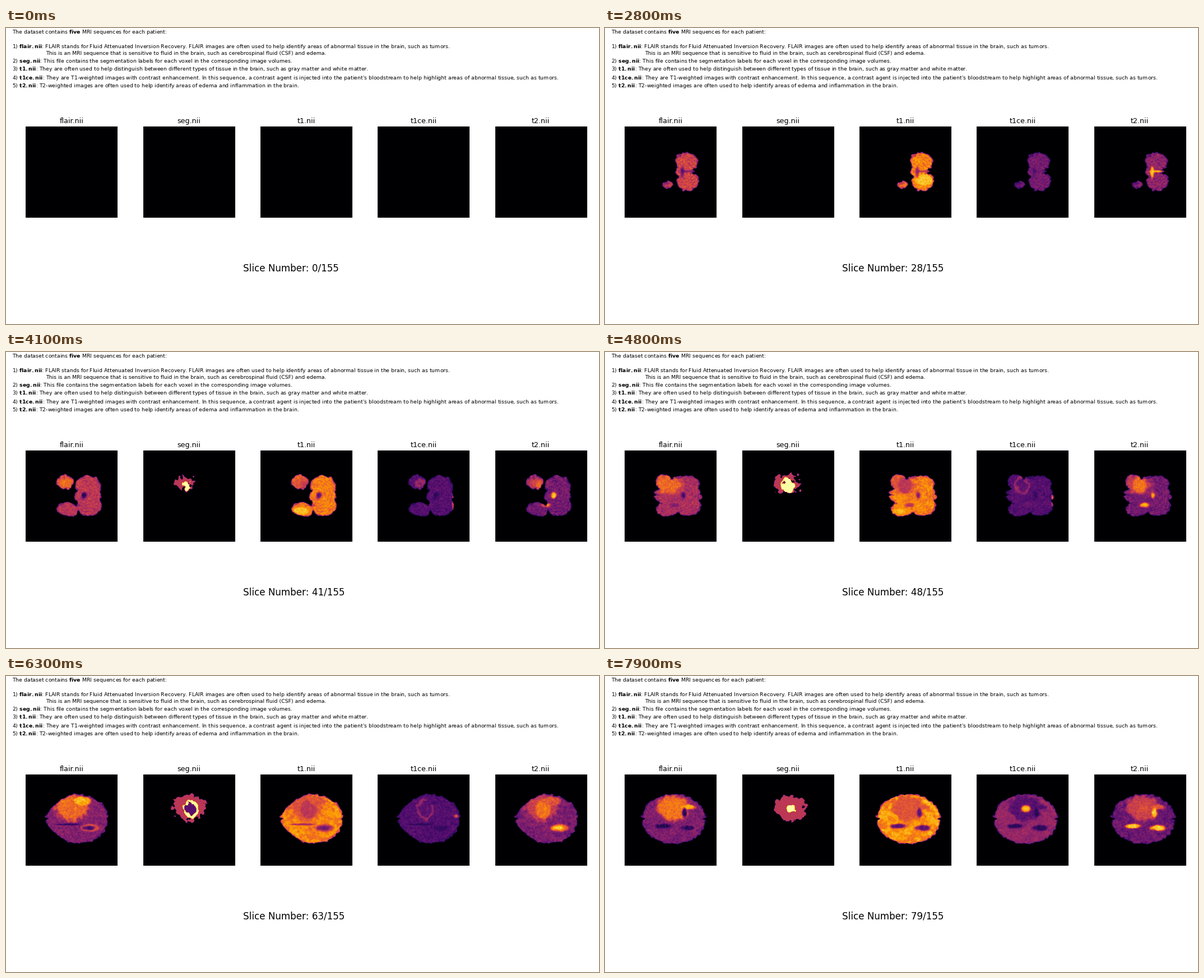
A matplotlib script that plays this animation: 1058x529 px, repeating every 8000 ms.

```python
import numpy as np
import matplotlib.pyplot as plt
from matplotlib.animation import FuncAnimation

W, H, DPI = 1058, 529, 64
SLICES, N, SIDE = 80, 240, 163.4
LEFT, TOP, PITCH = 35.4, 176, 209.3

plt.rcParams["font.family"] = "DejaVu Sans"
plt.rcParams["mathtext.fontset"] = "dejavusans"

# Pixel grid of one scan, in stage coordinates of the first panel.
steps = (np.arange(N) + 0.5) * SIDE / N
X, Y = np.meshgrid(LEFT + steps, TOP + steps)
rng = np.random.default_rng(7)


def noise(sz, sxy):
    """Smooth random volume with unit spread."""
    v = np.fft.rfftn(rng.standard_normal((SLICES, N, N)))
    fz = np.fft.fftfreq(SLICES)[:, None, None]
    fy = np.fft.fftfreq(N)[None, :, None]
    fx = np.fft.rfftfreq(N)[None, None, :]
    v *= np.exp(-2 * np.pi**2 * (sz**2 * fz**2 + sxy**2 * (fy**2 + fx**2)))
    v = np.fft.irfftn(v, s=(SLICES, N, N), axes=(0, 1, 2))
    return (v / v.std()).astype(np.float32)


coarse, grain = noise(2.5, 3.2), noise(0.8, 1.1)


def soft(field, w=0.8):
    return 1 / (1 + np.exp(-np.clip(field / w, -30, 30)))


def solid(z, center, radii, lean=0):
    """Slice of an ellipsoid: positive inside, about the pixels to its edge."""
    (cx, cy, cz), (rx, ry, rz) = center, radii
    dx = (X - cx - lean * (z - cz)) / rx
    r = np.sqrt(dx**2 + ((Y - cy) / ry) ** 2 + ((z - cz) / rz) ** 2)
    return (1 - r) * np.sqrt(rx * ry)


def cerebrum(z):
    """Flat-bottomed ellipsoid, pointed to the left in low slices."""
    dx = (X - 128 + 0.2 * (z - 54)) / 57
    dy = (Y - 256) / 44.5
    point = 1.5 * max(0, (79 - z) / 25) ** 2
    dy = dy * (1 + point * np.clip(-dx, 0, None) ** 2)
    r = np.sqrt(dx**2 + dy**2 + ((z - 76) / 34) ** 4)
    return (1 - r) * 50 - 4 * np.exp(-(((Y - 256) / 1.8) ** 2))


# Lower anatomy as (center, radii): cerebellum, vermis, stem, temporal lobes.
LOWER = [
    ((146, 241, 42), (23, 20, 30)),
    ((148, 274, 42), (23, 20, 30)),
    ((146, 257, 44), (25, 15, 20)),
    ((138, 257, 24), (12, 11, 19)),
    ((106, 233, 46), (16, 14, 15)),
    ((111, 282, 46), (20, 13, 21)),
]

# Tones of each tissue in flair, t1, t1ce and t2; nan keeps what lies below.
nan = np.nan
FLUID = (.14, .27, .15, .88)
HALO = (.64, .52, .23, .66)
CISTERN = (.36, .5, .3, .85)
FISSURE = (.18, .45, .16, .38)
MYELIN = (nan, .86, nan, nan)
VESSEL = (nan, nan, .75, nan)
EDEMA = (.69, .6, .25, .54)
BRIGHT_EDEMA = (.83, .61, .24, .62)
TUMOR = (.66, .5, .26, .69)
RIM = (nan, nan, .47, nan)
NODULE = (.7, .62, .85, .6)

FEATURES = [
    (MYELIN, (150, 272, 24), (17, 10, 14)),
    (MYELIN, (107, 285, 42), (14, 7, 8)),
    (CISTERN, (138, 258, 28), (3, 10, 9)),
    (CISTERN, (147, 257, 23), (14, 2, 12)),
    (CISTERN, (125, 274, 48), (8, 4, 11)),
    (FLUID, (139, 257, 40), (4.5, 5, 11)),
    (VESSEL, (170, 268, 41), (2, 14, 9)),
    (VESSEL, (175, 251, 59), (3, 2.5, 9)),
    (FISSURE, (110, 266, 62), (22, 1.8, 11)),
    (BRIGHT_EDEMA, (136, 224, 64), (15, 8, 11)),
    (BRIGHT_EDEMA, (148, 235, 79), (13, 4, 8)),
    (HALO, (150, 272, 68), (18, 7, 14)),
    (FLUID, (148, 272, 72), (14, 5, 14)),
    (FLUID, (103, 269, 79), (13, 4, 7)),
    (FLUID, (142, 244, 80), (4, 9, 7)),
]

# Healthy tissue at a few depths, again per channel.
DEPTHS = (15, 41, 63, 79)
BASE = ((.6, .5, .36, .34), (.74, .71, .73, .76), (.4, .25, .24, .4), (.45, .32, .34, .3))

per_channel = lambda *g: np.array(g)[:, None, None]
FOLD_GAIN = per_channel(-.03, -.1, -.03, .04)
ARC_GAIN = per_channel(.035, .045, .02, .035)
GRAIN_GAIN = per_channel(.03, .022, .022, .028)
arc_radius = np.hypot((X - 135) * .9, Y - 257)


def lesion(z):
    """Swelling, tumor mass, its dead core and a late bright nodule."""
    return (solid(z, (120, 236, 70), (30, 23, 34), lean=.3),
            solid(z, (119, 239, 58), (14, 17.5, 19), lean=.3),
            solid(z, (117, 237, 60), (10, 12, 10), lean=.5),
            solid(z, (123, 238, 80), (8, 6, 7)))


def scans(z, swelling, mass, core, nodule):
    """The four image channels of slice z."""
    depth = np.maximum.reduce([cerebrum(z)] + [solid(z, *part) for part in LOWER])
    depth = depth + .9 * coarse[z] + .2 * grain[z]
    img = per_channel(*[np.interp(z, DEPTHS, b) for b in BASE]) * np.ones((N, N))

    upper = np.interp(z, [38, 70], [0, 1])
    folds = np.tanh(1.8 * coarse[z]) * (.3 + .7 * np.exp(-np.clip(depth, 0, None) / 14))
    arcs = np.sin(1.2 * arc_radius + 1.5 * coarse[z]) * soft(X - 122, 4)
    img += FOLD_GAIN * folds * (.3 + .7 * upper) + ARC_GAIN * arcs * (1 - upper)

    def paint(field, tissue, w=.8):
        a = soft(field, w)
        for m, tone in enumerate(tissue):
            if tone == tone:
                img[m] += a * (tone - img[m])

    paint(swelling + 2 * coarse[z], EDEMA, 1.8)
    paint(mass, TUMOR)
    paint(1.3 - np.abs(mass + coarse[z]) - 9 * (z > 74), RIM)
    paint(nodule, NODULE)
    for tissue, center, radii in FEATURES:
        paint(solid(z, center, radii) + .4 * coarse[z], tissue)

    img += GRAIN_GAIN * grain[z]
    img *= .6 + .4 * np.clip(depth / 2.5, 0, 1)
    return np.where(depth > 0, np.clip(img, .04, 1), 0)


def segmentation(z, swelling, mass, core, nodule):
    rough = coarse[z] + .25 * grain[z]
    seg = np.where(swelling + 2.5 * rough > 0, .5, 0)
    seg[np.maximum(mass, nodule) + rough > 0] = 1
    seg[(core + 2.2 * rough > 0) & (mass > 1)] = .25
    return seg * (z > 34)


fig = plt.figure(figsize=(W / DPI, H / DPI), dpi=DPI, facecolor="white")


def label(x, y, s, px, **kw):
    return fig.text(x / W, 1 - y / H, s, fontsize=px * 72 / DPI, color="black", **kw)


INTRO = [
    (10, r"The dataset contains $\bf{five}$ MRI sequences for each patient:"),
    (36, r"1) $\bf{flair.nii}$: FLAIR stands for Fluid Attenuated Inversion Recovery. "
         "FLAIR images are often used to help identify areas of abnormal tissue "
         "in the brain, such as tumors."),
    (62, r"2) $\bf{seg.nii}$: This file contains the segmentation labels for each "
         "voxel in the corresponding image volumes."),
    (76.5, r"3) $\bf{t1.nii}$: They are often used to help distinguish between different "
           "types of tissue in the brain, such as gray matter and white matter."),
    (91.5, r"4) $\bf{t1ce.nii}$: They are T1-weighted images with contrast enhancement. "
           "In this sequence, a contrast agent is injected into the patient's "
           "bloodstream to help highlight areas of abnormal tissue, such as tumors."),
    (106, r"5) $\bf{t2.nii}$: T2-weighted images are often used to help identify areas "
          "of edema and inflammation in the brain."),
]
for y, line in INTRO:
    label(10.6, y, line, 9.39)
label(71, 48.5, "This is an MRI sequence that is sensitive to fluid in the brain, "
      "such as cerebrospinal fluid (CSF) and edema.", 9.39)

panels = []
for i, name in enumerate(["flair", "seg", "t1", "t1ce", "t2"]):
    x = LEFT + i * PITCH
    ax = fig.add_axes([x / W, 1 - (TOP + SIDE) / H, SIDE / W, SIDE / H])
    ax.axis("off")
    panels.append(ax.imshow(np.zeros((N, N)), cmap="inferno", vmin=0, vmax=1,
                            aspect="auto"))
    label(x + SIDE / 2, 170, name + ".nii", 12.6, ha="center")
counter = label(423.2, 434.7, "", 16.8)


def update(z):
    fields = lesion(z)
    flair, t1, t1ce, t2 = scans(z, *fields)
    seg = segmentation(z, *fields)
    for panel, data in zip(panels, (flair, seg, t1, t1ce, t2)):
        panel.set_data(data)
    counter.set_text(f"Slice Number: {z}/155")
    return [*panels, counter]


anim = FuncAnimation(fig, update, frames=SLICES, interval=100, repeat=True,
                     repeat_delay=0)
plt.show()
```
